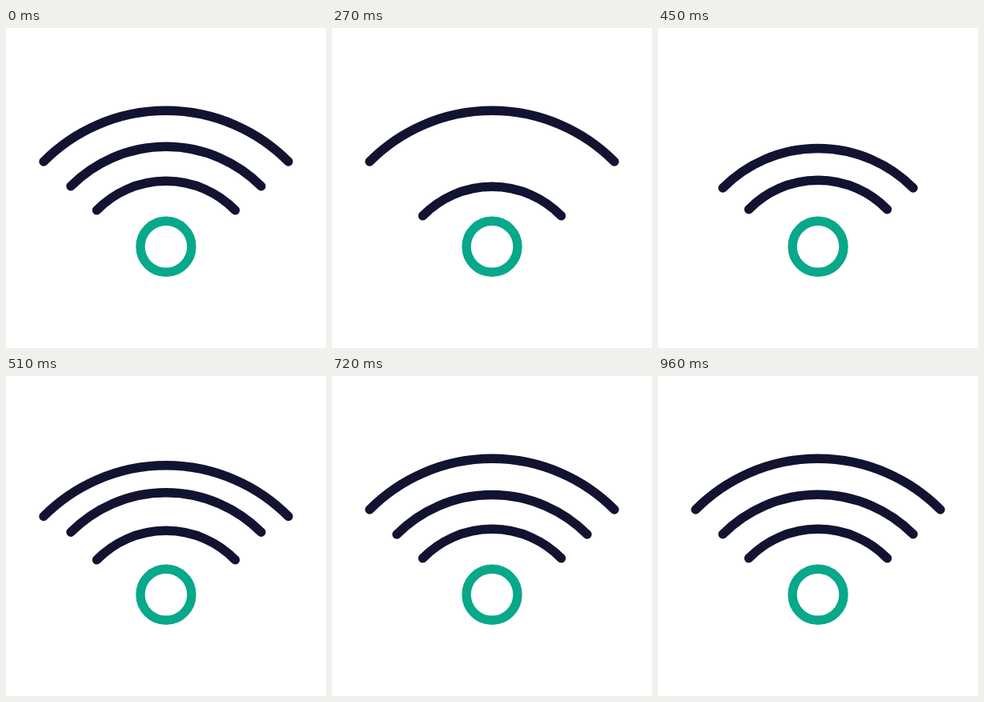
An HTML page that plays this animation: 400 by 400 pixels, repeating every 3050 ms.

```html
<!DOCTYPE html>
<html lang="en">
<head>
<meta charset="utf-8">
<title>Signal</title>
<style>
  html, body { margin: 0; width: 100%; height: 100%; overflow: hidden; background: #fff; }
  svg { display: block; width: 100%; height: 100%; }
</style>
</head>
<body>
<svg viewBox="0 0 400 400" fill="none" stroke-width="11.4" stroke-linecap="round">
  <circle cx="200" cy="273.3" r="32" stroke="#08a88a"/>
  <g id="arcs" stroke="#121331"></g>
</svg>
<script>
const LOOP = 3050;
const STEP = 30;
const EXIT_TIME = 120;
const DROP = 16;

// Each arc drops out of sight at `exit` and springs back from `enter`.
const arcs = [
  { top: 191.3, half: 86.5, sag: 36.5, exit: 0, enter: 210 },
  { top: 148.3, half: 119, sag: 49.5, exit: 90, enter: 300 },
  { top: 103.3, half: 153, sag: 63.7, exit: 300, enter: 460 }
];

// Vertical offset by time since re-entry.
const spring = [[0, DROP], [60, 7], [145, 2.6], [205, -2.8], [300, 2], [420, 0.2], [500, 0]];

function sample(keys, time) {
  for (let i = 1; i < keys.length; i++) {
    const [t0, v0] = keys[i - 1];
    const [t1, v1] = keys[i];
    if (time < t1) return v0 + (v1 - v0) * (time - t0) / (t1 - t0);
  }
  return keys[keys.length - 1][1];
}

// Returns null while the arc is hidden.
function offsetAt({ exit, enter }, time) {
  if (time >= enter) return sample(spring, time - enter);
  if (time <= exit) return 0;
  const progress = (time - exit) / EXIT_TIME;
  return progress < 1 ? DROP * progress ** 1.3 : null;
}

const group = document.getElementById("arcs");
for (const arc of arcs) {
  const { top, half, sag } = arc;
  const radius = (half * half + sag * sag) / (2 * sag);
  arc.path = document.createElementNS("http://www.w3.org/2000/svg", "path");
  arc.path.setAttribute("d",
    `M${200 - half} ${top + sag}A${radius} ${radius} 0 0 1 ${200 + half} ${top + sag}`);
  group.append(arc.path);
}

function render(time) {
  const stepped = Math.floor(time / STEP) * STEP;
  for (const arc of arcs) {
    const offset = offsetAt(arc, stepped);
    arc.path.setAttribute("visibility", offset === null ? "hidden" : "visible");
    arc.path.setAttribute("transform", `translate(0 ${offset ?? 0})`);
  }
}

const start = performance.now();
function tick() {
  render((performance.now() - start) % LOOP);
  requestAnimationFrame(tick);
}
tick();
</script>
</body>
</html>
```
